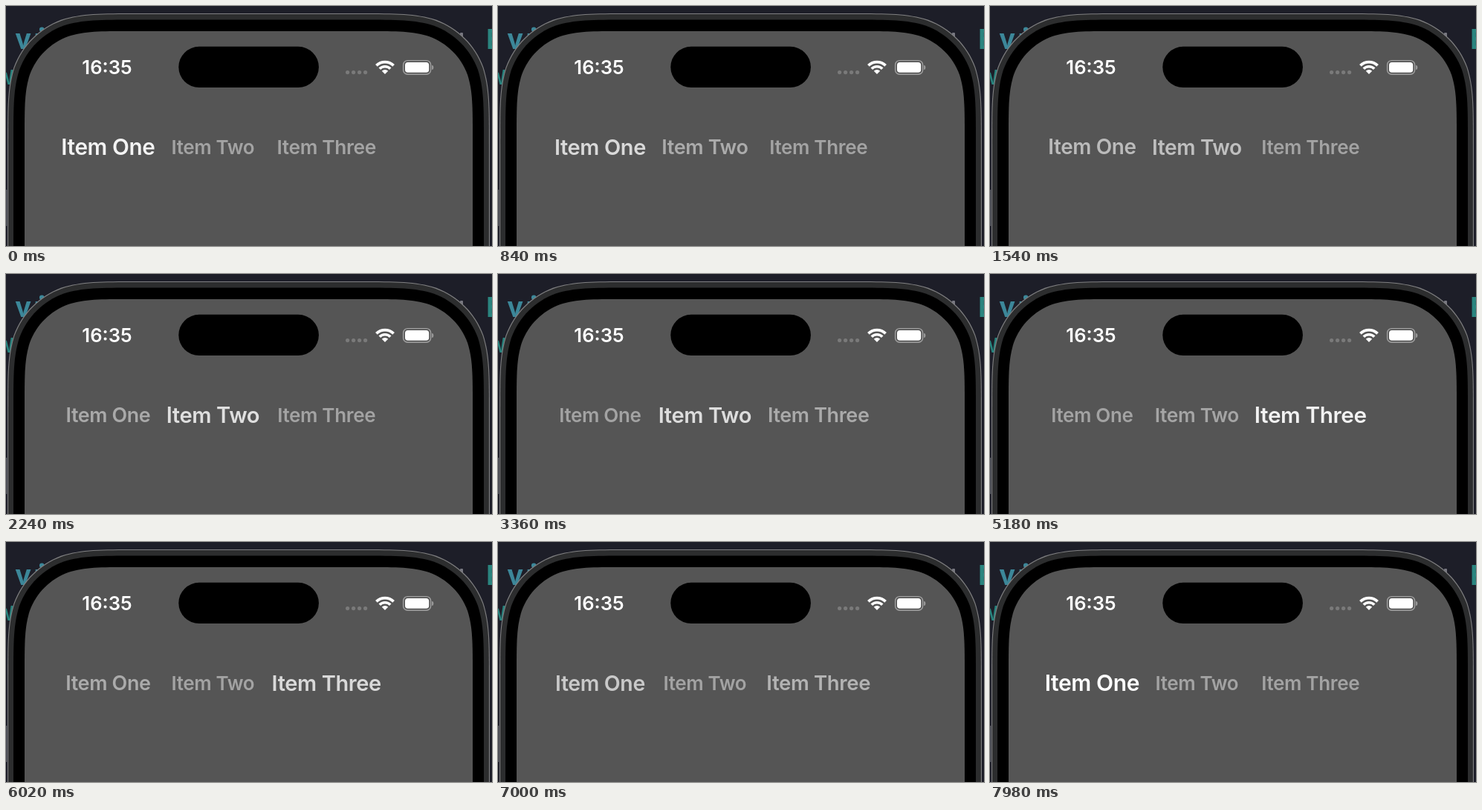
These frames come from a looping animation (654x324 px, 8000 ms). An HTML page with a canvas:

```html
<!DOCTYPE html>
<html lang="en">
<head>
<meta charset="utf-8">
<title>Tab items</title>
<style>
  html, body { margin: 0; width: 100%; height: 100%; overflow: hidden; background: #1d1e29; }
  canvas { display: block; }
</style>
</head>
<body>
<canvas id="stage" width="654" height="324"></canvas>
<script>
const ctx = document.getElementById('stage').getContext('2d');
const LOOP = 8000, TICK = 70;
const STEP = 2600, LEAD = 0.07;
const SMALL = 26, LARGE = 30, DIM = 0.46;
const SANS = 'Inter, Roboto, sans-serif';
const MONO = '"Noto Sans Mono", "DejaVu Sans Mono", monospace';
const ITEMS = [
  { label: 'Item One', x: 137.4 },
  { label: 'Item Two', x: 278.4 },
  { label: 'Item Three', x: 431.2 }
];

function box(x, y, w, h, r, fill) {
  ctx.beginPath();
  ctx.roundRect(x, y, w, h, r);
  ctx.fillStyle = fill;
  ctx.fill();
}

// Panel open at the bottom, its top corners with continuous curvature
function panel(left, top, right, r, fill) {
  const far = 1.52866 * r, c1 = 1.08849 * r, c2 = 0.86841 * r;
  const a = 0.63149 * r, b = 0.07491 * r;
  const p = 0.37282 * r, q = 0.16906 * r;
  ctx.beginPath();
  ctx.moveTo(left, 340);
  ctx.lineTo(left, top + far);
  ctx.bezierCurveTo(left, top + c1, left, top + c2, left + b, top + a);
  ctx.bezierCurveTo(left + q, top + p, left + p, top + q, left + a, top + b);
  ctx.bezierCurveTo(left + c2, top, left + c1, top, left + far, top);
  ctx.lineTo(right - far, top);
  ctx.bezierCurveTo(right - c1, top, right - c2, top, right - a, top + b);
  ctx.bezierCurveTo(right - p, top + q, right - q, top + p, right - b, top + a);
  ctx.bezierCurveTo(right, top + c2, right, top + c1, right, top + far);
  ctx.lineTo(right, 340);
  ctx.fillStyle = fill;
  ctx.fill();
}

function text(str, x, y, font, fill, align = 'left', spacing = 0) {
  ctx.font = font;
  ctx.letterSpacing = spacing + 'px';
  ctx.textAlign = align;
  ctx.fillStyle = fill;
  ctx.fillText(str, x, y);
}

function drawBackdrop() {
  ctx.fillStyle = '#1d1e28';
  ctx.fillRect(0, 0, 654, 324);
  text('vi', 11.9, 58, `700 37px ${MONO}`, '#3c8799', 'left', 2.5);
  text('w', -12, 106, `500 37px ${MONO}`, '#27837d');
  text('E', 645.6, 58, `600 38px ${MONO}`, '#2b857f');
  box(611, 36, 4, 6, 1, '#777780');
  box(0, 248, 1.2, 49, 0, '#62636a');
}

function drawPhone() {
  panel(2, 10, 651, 115, '#808082');
  panel(3.1, 11.1, 649.9, 114, '#2c2d2e');
  panel(10, 18.5, 643, 107, '#000');
  panel(25, 34, 628, 93, '#555');
  box(232.3, 54.8, 188.6, 55.2, 27.6, '#000');
}

function wifiArc(radius, width) {
  ctx.beginPath();
  ctx.arc(510, 92, radius, -Math.PI * 0.75, -Math.PI * 0.25);
  ctx.lineWidth = width;
  ctx.strokeStyle = '#fff';
  ctx.stroke();
}

function drawStatus() {
  text('16:35', 136, 92.3, `600 25.6px ${SANS}`, '#fff', 'center');
  for (let i = 0; i < 4; i++) box(457 + i * 8, 87, 5.2, 5.2, 2.6, '#7a7a7a');

  wifiArc(16.4, 3.8);
  wifiArc(10.2, 3.6);
  wifiArc(3, 6);

  ctx.beginPath();
  ctx.roundRect(534.6, 73.6, 37, 18.6, 5.8);
  ctx.lineWidth = 1.4;
  ctx.strokeStyle = '#a0a0a0';
  ctx.stroke();
  box(537, 76, 32.2, 13.8, 3.8, '#fff');
  box(573.2, 80, 2, 6, [0, 2, 2, 0], '#a0a0a0');
}

// Share of selection held by one item while it passes around the three
function selection(index, phase) {
  const gap = Math.abs(phase - index);
  return Math.max(0, 1 - Math.min(gap, 3 - gap));
}

function drawItems(time) {
  const phase = (time / STEP - LEAD + 3) % 3;
  ITEMS.forEach(({ label, x }, i) => {
    const on = selection(i, phase);
    const size = SMALL + (LARGE - SMALL) * on;
    // The dim label fades out below the bright one fading in
    const alpha = 1 - (1 - on) * (1 - DIM * (1 - on));
    text(label, x, 190.3 + size * 0.3636, `600 ${size}px ${SANS}`,
      `rgba(255,255,255,${alpha})`, 'center', -0.013 * size);
  });
}

function draw() {
  const time = Math.floor((performance.now() % LOOP) / TICK) * TICK;
  drawBackdrop();
  drawPhone();
  drawStatus();
  drawItems(time);
  requestAnimationFrame(draw);
}

draw();
</script>
</body>
</html>
```
